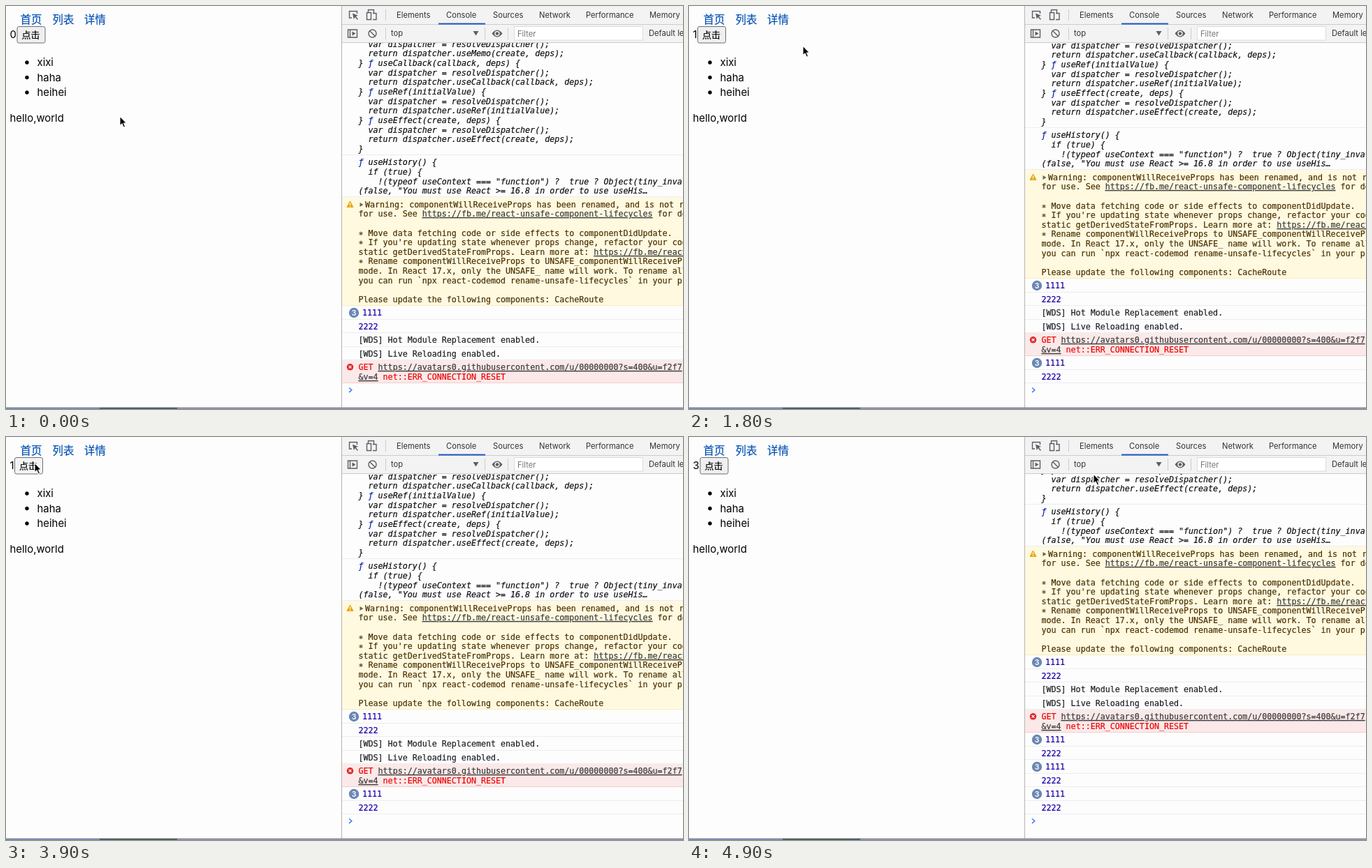
Animation, 969 px wide and 578 px high, one loop 5 s. Source, as an HTML page:

```html
<!DOCTYPE html>
<html lang="zh">
<head>
<meta charset="utf-8">
<title>Console</title>
<style>
  html, body { margin: 0; width: 100%; height: 100%; overflow: hidden; background: #fdfdfd; }
  svg { display: block; width: 100vw; height: 100vh; }
  text { white-space: pre; }
  .ui { font: 11.2px Inter, "Liberation Sans", sans-serif; fill: #333; }
  .page { font: 14.9px Inter, "Liberation Sans", sans-serif; fill: #000; }
  .cjk { font: 15.4px "Noto Sans CJK SC", "Noto Sans CJK", sans-serif; fill: #0552b5; stroke: #0552b5; stroke-width: .2; }
  .mono { font: 11.67px "DejaVu Sans Mono", "Liberation Mono", monospace; stroke-width: .2; }
  .code { font-style: italic; fill: #111; stroke: #111; }
  .warn { fill: #4a3100; stroke: #4a3100; }
  .num { fill: #1a00a8; stroke: #1a00a8; }
  .log { fill: #1c1f23; stroke: #1c1f23; }
  .err { fill: #ee0505; stroke: #ee0505; }
  .link { fill: #3c3c3c; stroke: #3c3c3c; text-decoration: underline; }
  .fn { fill: #0d22aa; stroke: #0d22aa; }
  .icon { fill: none; stroke: #5c5f63; stroke-width: 1.4; }
  .sep { stroke: #ccc; }
</style>
</head>
<body>
<svg viewBox="0 0 969 578" preserveAspectRatio="none">
  <defs><clipPath id="pane"><rect x="481" y="53" width="488" height="523"/></clipPath></defs>
  <rect width="969" height="578" fill="#fdfdfd"/>

  <g class="cjk">
    <text x="20.5" y="24.5">首页</text>
    <text x="66.5" y="24.5">列表</text>
    <text x="112" y="24.5">详情</text>
  </g>
  <g class="page">
    <text id="count" x="5.5" y="46">0</text>
    <text x="44.5" y="86">xixi</text>
    <text x="44.5" y="107.5">haha</text>
    <text x="44.5" y="129">heihei</text>
    <text x="5.5" y="165.5">hello,world</text>
    <circle cx="30" cy="81" r="2.7"/>
    <circle cx="30" cy="102.5" r="2.7"/>
    <circle cx="30" cy="124" r="2.7"/>
  </g>
  <g id="button">
    <rect id="face" x=".5" y="29.5" width="40" height="23.5" rx="2.5" fill="#efefef" stroke="#6e6e6e"/>
    <text class="cjk" x="7" y="46" style="font-size:13px;fill:#000;stroke:#000">点击</text>
  </g>

  <g clip-path="url(#pane)">
    <g id="console"></g>
    <path d="M491 547.5l3.8 3.3l-3.8 3.3" fill="none" stroke="#367cf1" stroke-width="1.5"/>
  </g>

  <rect x="481" width="488" height="52" fill="#f3f3f3"/>
  <rect id="hover" x="819" width="90" height="26" fill="#e8e8e5"/>
  <path class="sep" d="M481 26.5H969M481 52.5H969M543.5 5V21M543.5 31V48M685.5 31V48M718.5 31V48"/>
  <rect x="619" y="24.5" width="67" height="2" fill="#1d5bc6"/>
  <path d="M480.5 0V576" stroke="#b4b4b4"/>
  <g class="ui">
    <g id="tabs"></g>
    <text x="551" y="43">top</text>
    <path d="M668.5 36h8l-4 6.5z" fill="#5c5f63"/>
    <rect x="727.5" y="29.5" width="184" height="19.5" fill="#fff" stroke="#dcdcdc"/>
    <text x="732" y="43.5" style="fill:#757575">Filter</text>
    <text x="920" y="43">Default levels</text>
  </g>
  <g class="icon">
    <path d="M495 17h-3.5V7.5h11V11"/>
    <path d="M496 10.5l8 3.3l-3.3 1.2l3.3 3.8l-1.2 1l-3.3-3.8l-1.7 3z" fill="#5c5f63" stroke="none"/>
    <path d="M518.5 9V5.5h8V10M516.5 9.5h6v10h-6zM525 10.5h5v9h-5"/>
    <path d="M489.5 34h13v11h-13zM492.5 34v11"/>
    <path d="M495.5 36.5l5 3l-5 3z" fill="#5c5f63" stroke="none"/>
    <circle cx="524.5" cy="39.5" r="5.5"/>
    <path d="M520.5 35.5l8 8"/>
    <path d="M695.5 39.5Q703 29.5 710.5 39.5Q703 49.5 695.5 39.5z" fill="#5c5f63" stroke="none"/>
    <circle cx="703" cy="39.5" r="3" fill="#5c5f63" stroke="#f3f3f3"/>
  </g>

  <rect y="575.5" width="969" height="2.5" fill="#8f93a6"/>
  <rect y="576" width="134" height="2" fill="#7f8bb0"/>
  <rect x="134" y="576" width="111" height="2" fill="#4a6461"/>

  <g id="tip">
    <rect x="604" y="94" width="380" height="23" fill="#000" opacity=".14"/>
    <rect x="602.5" y="92" width="380" height="23" fill="#ececec" stroke="#c4c4c4"/>
    <text class="ui" x="611" y="107" style="font-size:10.87px;fill:#111">function useRef(initialValue) { var dispatcher = resolveDispatcher(); return dispatcher</text>
  </g>
  <path id="cursor" d="M0 0V13.8L3.1 10.9L5.4 16.3L7.7 15.3L5.5 10.1H9.7z" fill="#000" stroke="#fff" stroke-width="1.1" stroke-linejoin="round"/>
</svg>
<script>
const NS = "http://www.w3.org/2000/svg";
const $ = id => document.getElementById(id);

function add(parent, tag, attrs, text) {
  const el = document.createElementNS(NS, tag);
  for (const k in attrs) el.setAttribute(k, attrs[k]);
  if (text) el.textContent = text;
  parent.append(el);
  return el;
}

[["Elements", 559], ["Console", 630], ["Sources", 697], ["Network", 763], ["Performance", 830], ["Memory", 921]]
  .forEach(([name, x]) => add($("tabs"), "text", { x, y: 17 }, name));

const LINE = 13.65, SINGLE = 19.5;
const paint = { warn: ["#fff9e0", "#f7edbf"], err: ["#fbe9e9", "#f5cfcf"] };

// Bars enclose links; the function sign gets its own colour.
function writeLine(parent, x, y, cls, str) {
  const el = add(parent, "text", { x, y: Math.round(y), class: "mono " + cls });
  str.split("|").forEach((part, i) => {
    if (i % 2) add(el, "tspan", { class: "link" }, part);
    else part.split(/(ƒ)/).forEach(s => s && add(el, "tspan", s === "ƒ" ? { class: "fn" } : {}, s));
  });
}

function addRow(top, height, cls, lines, x = 504.5) {
  const g = add($("console"), "g", {});
  const [fill, edge] = paint[cls] || ["none", "#ededed"];
  add(g, "rect", { x: 481, y: top, width: 488, height, fill });
  add(g, "path", { d: `M481 ${Math.round(top + height) - .5}H969`, stroke: edge });
  const pad = lines.length > 2 ? 2.9 : 2.5;
  lines.forEach((s, i) => {
    const indent = cls === "warn" && !i ? 9.5 : 0;
    if (s) writeLine(g, x + indent, top + pad + 11.35 + i * LINE, cls, s);
  });
  return g;
}

function addPair(top) {
  const a = addRow(top, SINGLE, "num", ["1111"], 510);
  add(a, "circle", { cx: 498, cy: top + 9.8, r: 7.2, fill: "#6a88b4" });
  add(a, "text", { x: 498, y: top + 13.6, class: "ui", "text-anchor": "middle", style: "fill:#fff;font-size:10.5px;font-weight:600" }, "3");
  return [a, addRow(top + SINGLE, SINGLE, "num", ["2222"])];
}

const hook = (name, args) => [
  "  var dispatcher = resolveDispatcher();",
  `  return dispatcher.${name}(${args});`
];
const hooks = [
  ...hook("useMemo", "create, deps"),
  "} ƒ useCallback(callback, deps) {", ...hook("useCallback", "callback, deps"),
  "} ƒ useRef(initialValue) {", ...hook("useRef", "initialValue"),
  "} ƒ useEffect(create, deps) {", ...hook("useEffect", "create, deps"),
  "}"
];
addRow(214 - hooks.length * LINE - 5.8, hooks.length * LINE + 5.8, "code", hooks);
addRow(214, 60.4, "code", [
  "ƒ useHistory() {",
  "  if (true) {",
  "    !(typeof useContext === \"function\") ?  true ? Object(tiny_invariant",
  "(false, \"You must use React >= 16.8 in order to use useHis…"
]);
const warn = addRow(274.3, 155.9, "warn", [
  "Warning: componentWillReceiveProps has been renamed, and is not recommended",
  "for use. See |https://fb.me/react-unsafe-component-lifecycles| for details.",
  "",
  "∗ Move data fetching code or side effects to componentDidUpdate.",
  "∗ If you're updating state whenever props change, refactor your code",
  "static getDerivedStateFromProps. Learn more at: |https://fb.me/react-derived|",
  "∗ Rename componentWillReceiveProps to UNSAFE_componentWillReceiveProps",
  "mode. In React 17.x, only the UNSAFE_ name will work. To rename all",
  "you can run `npx react-codemod rename-unsafe-lifecycles` in your project",
  "",
  "Please update the following components: CacheRoute"
]);
add(warn, "path", { d: "M492.5 280L497 288.5H488z", fill: "#e8a812", stroke: "#e8a812", "stroke-linejoin": "round" });
add(warn, "path", { d: "M492.5 282.5v3M492.5 286.7v1.3", stroke: "#fff", "stroke-width": 1.3 });
add(warn, "path", { d: "M506.5 282l5 3l-5 3z", fill: "#6b6250" });

addPair(430.2);
addRow(469.2, SINGLE, "log", ["[WDS] Hot Module Replacement enabled."]);
addRow(488.7, SINGLE, "log", ["[WDS] Live Reloading enabled."]);
const err = addRow(508.2, 33, "err", [
  "GET |https://avatars0.githubusercontent.com/u/00000000?s=400&u=f2f7|",
  "|&v=4| net::ERR_CONNECTION_RESET"
]);
add(err, "circle", { cx: 492.5, cy: 517.8, r: 4.8, fill: "#dc2a2a" });
add(err, "path", { d: "M490.6 515.9l3.8 3.8M494.4 515.9l-3.8 3.8", stroke: "#fff", "stroke-width": 1.2 });
const pairs = [0, 1, 2].map(i => addPair(541.2 + i * 39));

// time, x, y of the pointer
const path = [
  [0, 163, 158], [200, 163, 158], [900, 47, 42], [1400, 47, 42], [1800, 163, 57],
  [2100, 560, 20], [2200, 760, -20], [2300, 862, -25], [2400, 926, 50],
  [2700, 508, 474], [3000, 570, 93], [3300, 570, 93], [3600, 46, 30],
  [3700, 41, 37], [4400, 41, 37], [4800, 858, 234], [4900, 579, 53]
];
const clicks = [1300, 4000, 4400];

function pointer(t) {
  const i = path.findIndex(p => p[0] >= t);
  if (i <= 0) return path[0].slice(1);
  const [t0, x0, y0] = path[i - 1], [t1, x1, y1] = path[i];
  const k = (t - t0) / (t1 - t0);
  return [x0 + (x1 - x0) * k, y0 + (y1 - y0) * k];
}

const show = (el, on) => el.setAttribute("visibility", on ? "visible" : "hidden");

function draw(now) {
  const t = Math.floor((now % 5000) / 100) * 100;
  const n = clicks.filter(c => t >= c).length;
  const [x, y] = pointer(t);
  const left = n === 1 ? 12 : 15.5;
  const over = x >= left && x < left + 41 && y >= 29 && y < 53;
  const down = clicks.some(c => t === c - 100);

  $("count").textContent = n;
  $("button").setAttribute("transform", `translate(${left} 0)`);
  $("face").setAttribute("fill", down ? "#f3f3f3" : over ? "#dfdfdf" : "#efefef");
  $("console").setAttribute("transform", `translate(0 ${-39 * n})`);
  pairs.forEach((rows, i) => rows.forEach(r => show(r, i < n)));
  show($("hover"), t >= 2200 && t < 2400);
  show($("tip"), t >= 3100 && t < 3500);
  $("cursor").setAttribute("transform", `translate(${x.toFixed(1)} ${y.toFixed(1)})`);
}

const start = performance.now();
function tick() {
  draw(performance.now() - start);
  requestAnimationFrame(tick);
}
tick();
</script>
</body>
</html>
```
